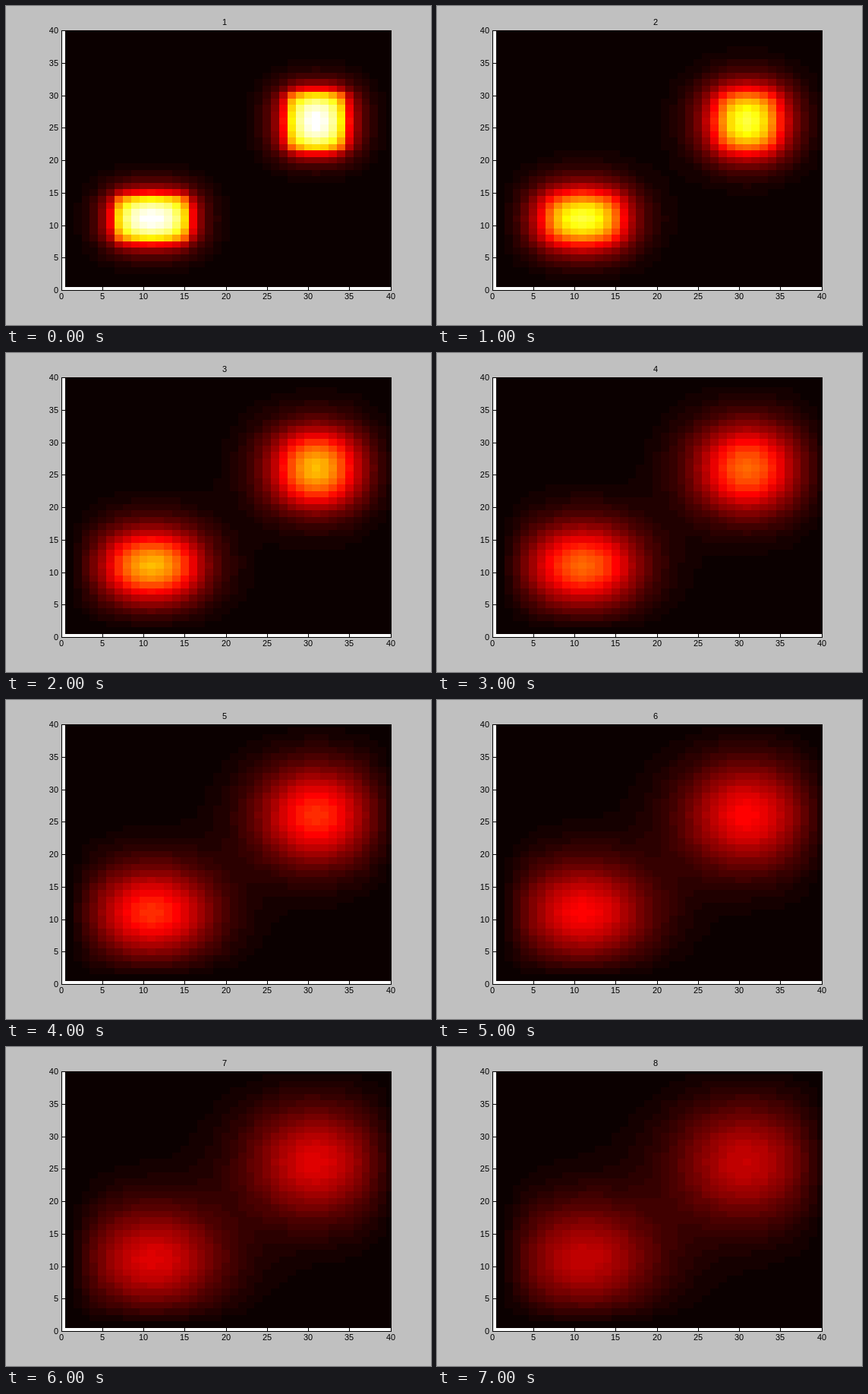
An HTML page with a canvas that plays this animation: 560x420 px, repeating every 8 s.

```html
<!DOCTYPE html>
<html lang="en">
<head>
<meta charset="utf-8">
<title>Heat diffusion</title>
<style>
  html, body { margin: 0; width: 100%; height: 100%; overflow: hidden; background: #c0c0c0; }
  canvas { display: block; }
</style>
</head>
<body>
<canvas id="plot" width="560" height="420"></canvas>
<script>
const ctx = document.getElementById('plot').getContext('2d');
const N = 41, W = N + 1, LAMBDA = 2.5, STEPS = 8, STEP_MS = 1000;
const LEFT = 73, TOP = 32, RIGHT = 507, BOTTOM = 374;
const px = x => LEFT + x * (RIGHT - LEFT) / 40;
const py = y => BOTTOM - y * (BOTTOM - TOP) / 40;

// Two hot boxes on a cold plate, 1-based indices.
function initial() {
  const u = new Float64Array(W * W);
  const box = (cx, cy, rx, ry) => {
    for (let y = cy - ry; y <= cy + ry; y++)
      for (let x = cx - rx; x <= cx + rx; x++) u[y * W + x] = 1;
  };
  box(11, 11, 4, 3);
  box(31, 26, 3, 4);
  return u;
}

// One implicit Euler step, edges held at zero, solved by Gauss-Seidel.
function diffuse(u) {
  const v = u.slice();
  for (let pass = 0; pass < 120; pass++)
    for (let y = 2; y < N; y++)
      for (let x = 2; x < N; x++) {
        const i = y * W + x;
        v[i] = (u[i] + LAMBDA * (v[i - 1] + v[i + 1] + v[i - W] + v[i + W])) / (1 + 4 * LAMBDA);
      }
  return v;
}

// 64-level black-red-yellow-white colour map.
function hot(value) {
  const n = Math.min(63, Math.floor(value * 64)) + 1;
  const ramp = (from, len) => Math.round(255 * Math.max(0, Math.min(1, (n - from) / len)));
  return `rgb(${ramp(0, 24)},${ramp(24, 24)},${ramp(48, 16)})`;
}

const fields = [];
for (let k = 0, u = initial(); k < STEPS; k++) fields.push(u = diffuse(u));
const peak = Math.max(...fields[0]);

function label(text, x, y, align) {
  ctx.textAlign = align;
  ctx.fillText(text, x, y);
}

function drawAxes() {
  ctx.fillStyle = '#000';
  ctx.fillRect(LEFT, TOP, 1, BOTTOM - TOP + 1);
  ctx.fillRect(LEFT, BOTTOM, RIGHT - LEFT + 1, 1);
  for (let v = 0; v <= 40; v += 5) {
    const x = Math.floor(px(v)), y = Math.round(py(v));
    ctx.fillRect(x, BOTTOM - 4, 1, 4);
    ctx.fillRect(LEFT, y, 5, 1);
    label(v, x, BOTTOM + 12, 'center');
    label(v, LEFT - 4, y + 4, 'right');
  }
}

function draw(k) {
  ctx.fillStyle = '#c0c0c0';
  ctx.fillRect(0, 0, 560, 420);
  ctx.fillStyle = '#fff';
  ctx.fillRect(LEFT, TOP, RIGHT - LEFT + 1, BOTTOM - TOP + 1);
  for (let y = 1; y <= 40; y++)
    for (let x = 1; x <= 40; x++) {
      const x0 = Math.floor(px(x - 0.5));
      const x1 = Math.min(RIGHT + 1, Math.floor(px(x + 0.5)));
      const y0 = Math.max(TOP, Math.round(py(y + 0.5)));
      const y1 = Math.round(py(y - 0.5));
      ctx.fillStyle = hot(fields[k][y * W + x] / peak);
      ctx.fillRect(x0, y0, x1 - x0, y1 - y0);
    }
  ctx.font = '11px "Liberation Sans", Arial, sans-serif';
  drawAxes();
  label(k + 1, 288, 25, 'center');
}

let shown = -1;
function tick() {
  const k = Math.floor(performance.now() / STEP_MS) % STEPS;
  if (k !== shown) draw(shown = k);
  requestAnimationFrame(tick);
}
tick();
</script>
</body>
</html>
```
